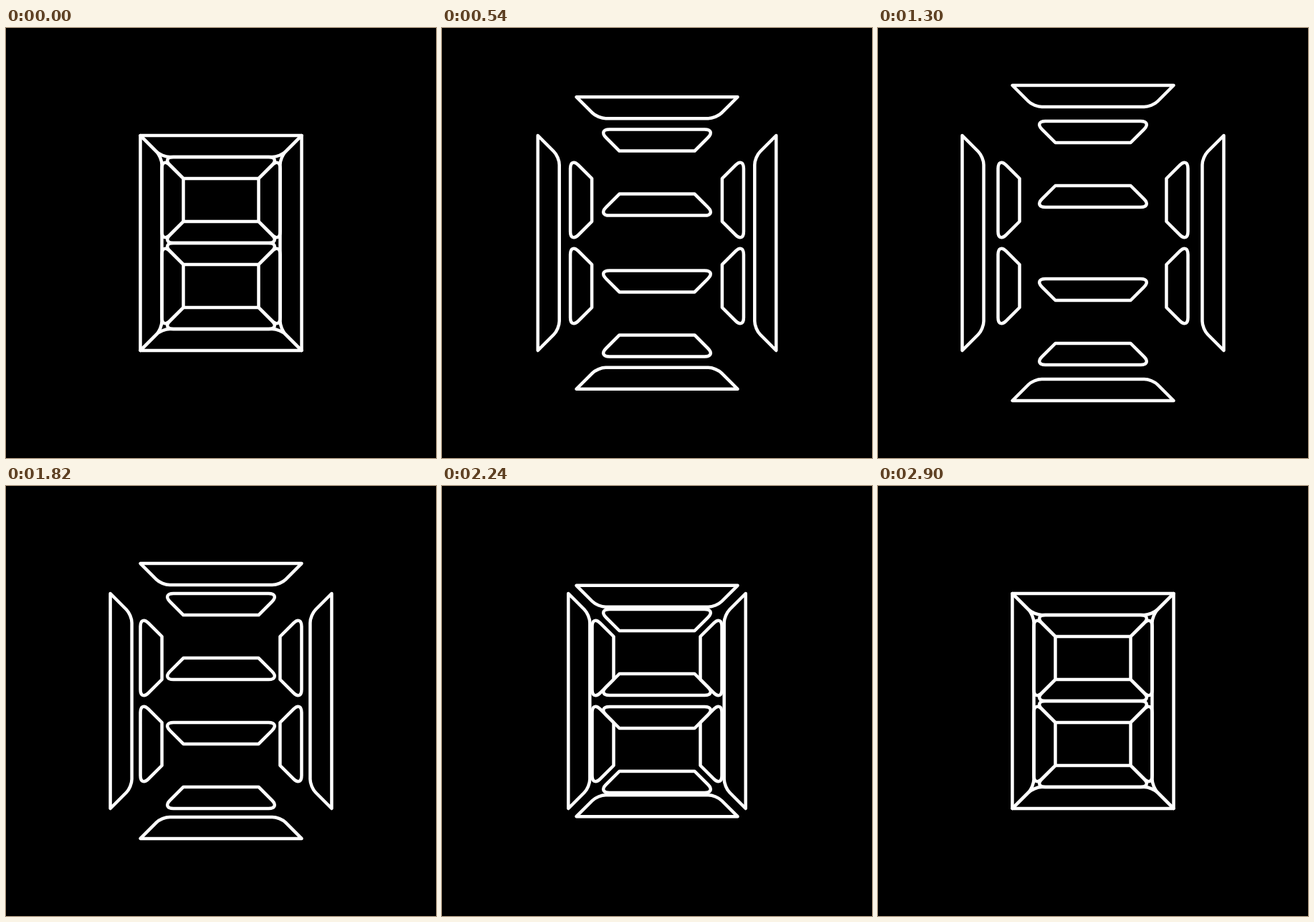
Recreate the animation shown at these times as an HTML page with a canvas. Size 600 by 600 pixels, loop 3220 ms.

```html
<!DOCTYPE html>
<html lang="en">
<head>
<meta charset="utf-8">
<title>Exploding segments</title>
<style>
  html, body { margin: 0; width: 100%; height: 100%; overflow: hidden; background: #000; }
  canvas { display: block; width: 600px; height: 600px; }
</style>
</head>
<body>
<canvas id="stage" width="600" height="600"></canvas>
<script>
const ctx = document.getElementById('stage').getContext('2d');

const LOOP = 3220, STEP = 20, CLOSE_AT = 1600, TRAVEL = 1400;
const FAR = 70, NEAR = 50;   // travel of the outer and inner bars
const SOFT = 11, NOSE = 16;  // corner cut lengths

// Corners are [x, y, cut], relative to the centre; dx, dy is the direction of travel.
const outerTop = {
  dx: 0, dy: -1, reach: FAR,
  pts: [[-112.5, -150, 0], [112.5, -150, 0], [82.5, -120, SOFT], [-82.5, -120, SOFT]]
};
const outerLeft = {
  dx: -1, dy: 0, reach: FAR,
  pts: [[-112.5, -150, 0], [-82.5, -120, SOFT], [-82.5, 120, SOFT], [-112.5, 150, 0]]
};
const innerTop = {
  dx: 0, dy: -1, reach: NEAR,
  pts: [[-82.5, -120, NOSE], [82.5, -120, NOSE], [52.5, -90, 0], [-52.5, -90, 0]]
};
const innerMid = {
  dx: 0, dy: -1, reach: NEAR,
  pts: [[-52.5, -30, 0], [52.5, -30, 0], [82.5, 0, NOSE], [-82.5, 0, NOSE]]
};
const innerLeft = {
  dx: -1, dy: 0, reach: NEAR,
  pts: [[-82.5, -120, NOSE], [-52.5, -90, 0], [-52.5, -30, 0], [-82.5, 0, NOSE]]
};

function mirror(bar, sx, sy) {
  return {
    dx: bar.dx * sx, dy: bar.dy * sy, reach: bar.reach,
    pts: bar.pts.map(([x, y, cut]) => [x * sx, y * sy, cut])
  };
}

const bars = [outerTop, innerTop, innerMid, outerLeft, innerLeft, mirror(innerLeft, 1, -1)];
for (const bar of bars.slice()) {
  bars.push(bar.dx ? mirror(bar, -1, 1) : mirror(bar, 1, -1));
}

// Point at the given distance from a towards b.
function toward(a, b, dist) {
  const k = dist / Math.hypot(b[0] - a[0], b[1] - a[1]);
  return [a[0] + (b[0] - a[0]) * k, a[1] + (b[1] - a[1]) * k];
}

function outline(pts) {
  const path = new Path2D();
  pts.forEach((p, i) => {
    const prev = pts[(i + pts.length - 1) % pts.length];
    const next = pts[(i + 1) % pts.length];
    const cut = p[2];
    path.lineTo(...toward(p, prev, cut));
    if (cut) {
      path.bezierCurveTo(
        ...toward(p, prev, cut * 0.448),
        ...toward(p, next, cut * 0.448),
        ...toward(p, next, cut));
    }
  });
  path.closePath();
  return path;
}

for (const bar of bars) bar.path = outline(bar.pts);

const easeOut = u => 1 - Math.pow(1 - Math.min(u, 1), 3);

function spread(t) {
  return t < CLOSE_AT
    ? easeOut(t / TRAVEL)
    : 1 - easeOut((t - CLOSE_AT) / TRAVEL);
}

function draw(t) {
  const s = spread(t);
  ctx.setTransform(1, 0, 0, 1, 0, 0);
  ctx.fillStyle = '#000';
  ctx.fillRect(0, 0, 600, 600);
  ctx.strokeStyle = '#fff';
  ctx.lineWidth = 4.5;
  ctx.lineJoin = 'round';
  for (const bar of bars) {
    const d = bar.reach * s;
    ctx.setTransform(1, 0, 0, 1, 300 + bar.dx * d, 300 + bar.dy * d);
    ctx.stroke(bar.path);
  }
}

const start = performance.now();
function tick() {
  const t = (performance.now() - start) % LOOP;
  draw(Math.floor(t / STEP) * STEP);
  requestAnimationFrame(tick);
}
draw(0);
requestAnimationFrame(tick);
</script>
</body>
</html>
```
